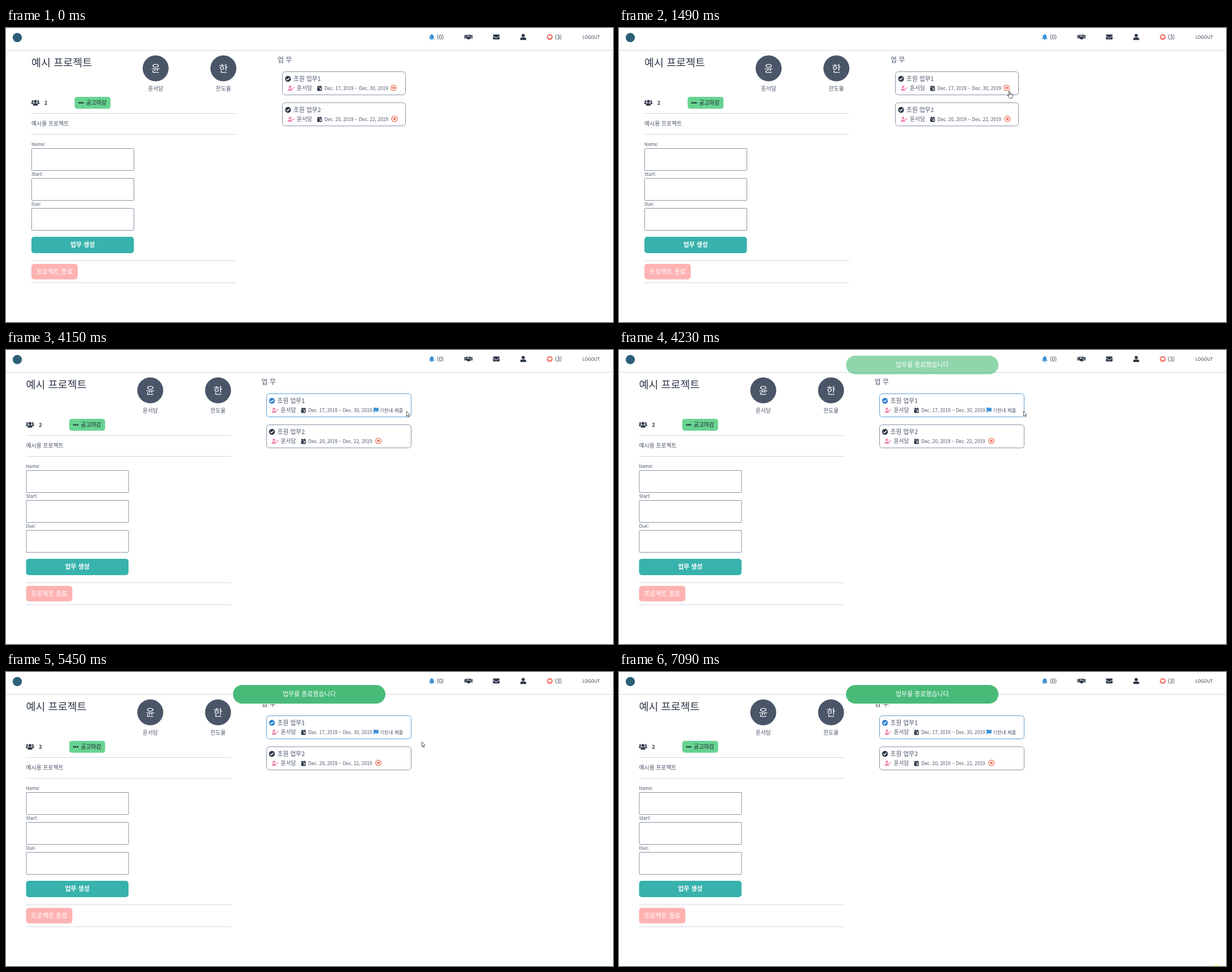
Write an HTML page that moves like this. It is 1075 by 521 pixels and loops after 7.19 s.

```html
<!DOCTYPE html>
<html lang="ko">
<head>
<meta charset="utf-8">
<title>Task board</title>
<style>
html, body { margin: 0; width: 100%; height: 100%; overflow: hidden; background: #fff; }
svg { display: block; width: 1075px; height: 521px; }
text { font-family: "Noto Sans CJK KR", "Noto Sans CJK", "Noto Sans", sans-serif; white-space: pre; }
</style>
</head>
<body>
<svg id="stage" viewBox="0 0 1075 521" xmlns="http://www.w3.org/2000/svg"></svg>
<script>
const LOOP = 7190, TICK = 77.5;
const INK = '#2d3748', GREY = '#4a5568', BLUE = '#3a90d5', RED = '#f0735f', LINE = '#d3d8e2', EDGE = '#8792a5';
const stage = document.getElementById('stage');

// Text is placed by its vertical centre.
const text = (x, cy, size, str, { fill = GREY, weight = 400, anchor = 'start' } = {}) =>
  `<text x="${x}" y="${cy + size * 0.37}" font-size="${size}" fill="${fill}" font-weight="${weight}" text-anchor="${anchor}">${str}</text>`;
const rect = (x, y, w, h, r, fill, extra = '') =>
  `<rect x="${x}" y="${y}" width="${w}" height="${h}" rx="${r}" fill="${fill}" ${extra}/>`;
const circle = (x, y, r, fill, extra = '') => `<circle cx="${x}" cy="${y}" r="${r}" fill="${fill}" ${extra}/>`;
const path = (d, fill, extra = '') => `<path d="${d}" fill="${fill}" ${extra}/>`;
const stroke = (d, color, width) =>
  path(d, 'none', `stroke="${color}" stroke-width="${width}" stroke-linecap="round" stroke-linejoin="round"`);
const group = (x, y, body, id = '') => `<g ${id && `id="${id}"`} transform="translate(${x} ${y})">${body}</g>`;

// Icons are drawn around their centre.
const icon = {
  bell: path('M0 -5.2C.6 -5.2 .8 -4.8 .8 -4.3C2.6 -3.9 3.4 -2.5 3.4 -.8C3.4 1.2 3.8 1.9 4.4 2.4C4.8 2.8 4.6 3.4 4 3.4H-4C-4.6 3.4 -4.8 2.8 -4.4 2.4C-3.8 1.9 -3.4 1.2 -3.4 -.8C-3.4 -2.5 -2.6 -3.9 -.8 -4.3C-.8 -4.8 -.6 -5.2 0 -5.2ZM-1.4 4H1.4A1.4 1.4 0 0 1 -1.4 4Z', BLUE),
  hands: path('M-7.2 -3.4H-5.3V2.6H-7.2ZM5.3 -3.4H7.2V2.6H5.3ZM-4.8 -3.2L-2.8 -4.2H-.4L-2.6 -1.8C-2.8 -.5 -1.4 .2 -.4 -.7L.8 -1.7L4.6 1.6C5 2.4 4 3.2 3.4 2.8C3.2 3.8 2.2 4 1.6 3.6C.8 4.7 -.4 4.5 -1 3.9L-3.8 2.2H-4.8ZM4.8 -3.2L2.8 -4.2H.8L-1.6 -1.7C-1.6 -1.1 -1.1 -1 -.7 -1.4L.9 -2.7L4.8 .7Z', INK),
  mail: path('M-4.9 -4.4H4.9Q5.8 -4.4 5.8 -3.5V-2.6L1 .9Q0 1.5 -1 .9L-5.8 -2.6V-3.5Q-5.8 -4.4 -4.9 -4.4ZM-5.8 -1.4L-1.4 1.7Q0 2.5 1.4 1.7L5.8 -1.4V3.3Q5.8 4.2 4.9 4.2H-4.9Q-5.8 4.2 -5.8 3.3Z', INK),
  user: circle(0, -2.8, 2.8, INK) + path('M-5.2 5.3V3.6Q-5.2 .8 -2.4 .8H2.4Q5.2 .8 5.2 3.6V5.3Z', INK),
  heart: circle(0, 0, 5.3, '#f47c72') + path('M0 3L-2.7 .2C-3.6 -.9 -2.9 -2.4 -1.7 -2.4C-.9 -2.4 -.4 -2 0 -1.4C.4 -2 .9 -2.4 1.7 -2.4C2.9 -2.4 3.6 -.9 2.7 .2Z', '#fff'),
  team: circle(-5, -2.8, 1.6, INK) + circle(5, -2.8, 1.6, INK) + circle(0, -2.2, 2.6, INK) +
    path('M-7.2 2.4V.7Q-7.2 -.7 -5.8 -.7H-4.2Q-3.3 -.7 -2.9 0Q-4.4 .9 -4.6 2.4ZM7.2 2.4V.7Q7.2 -.7 5.8 -.7H4.2Q3.3 -.7 2.9 0Q4.4 .9 4.6 2.4ZM-4.2 5.1V3.7Q-4.2 1 -1.7 1H1.7Q4.2 1 4.2 3.7V5.1Z', INK),
  check: color => circle(0, 0, 5.2, color) + stroke('M-2.5 .2L-.8 1.9L2.6 -1.6', '#fff', 1.4),
  member: circle(-2, -2.4, 2.3, '#f687b3') + path('M-5.8 4.6V3.2Q-5.8 .8 -3.5 .8H-.5Q1.8 .8 1.8 3.2V4.6Z', '#f687b3') +
    stroke('M1.6 -.2L2.9 1.1L5.4 -1.6', '#f687b3', 1.2),
  date: path('M-2.6 -4.8H-1.4V-3.6H1.4V-4.8H2.6V-3.6H3.3Q4.1 -3.6 4.1 -2.8V-1.9H-4.1V-2.8Q-4.1 -3.6 -3.3 -3.6H-2.6ZM-4.1 -1.3H4.1V3.8Q4.1 4.6 3.3 4.6H-3.3Q-4.1 4.6 -4.1 3.8ZM.3 .2V2.8H2.8V.2Z', INK, 'fill-rule="evenodd"'),
  stop: circle(0, 0, 4.9, 'none', `stroke="${RED}" stroke-width="1.3"`) + rect(-2.1, -2.1, 4.2, 4.2, .5, RED),
  flag: path('M-4.4 -4.8H-3.3V-3.9C-1.6 -4.9 .4 -3 4.4 -4.2V1.9C1.2 3.3 -1 1.2 -3.3 2.2V4.9H-4.4Z', BLUE)
};

const header = path('M0 39.5H1075', 'none', `stroke="${LINE}"`) +
  circle(20, 17, 8.2, '#2d6078') +
  group(754, 16, icon.bell) + text(763, 16, 10, '(0)', { fill: INK }) +
  group(819, 16, icon.hands) + group(868.3, 16, icon.mail) + group(916, 16, icon.user) +
  group(963, 16, icon.heart) + text(972, 16, 10, '(3)', { fill: INK }) +
  text(1021, 16.5, 7.7, 'LOGOUT', { fill: INK });

const avatar = (x, name) => circle(x, 71.5, 23, GREY) +
  text(x, 71.5, 17.5, name[0], { fill: '#fff', weight: 300, anchor: 'middle' }) +
  text(x, 107.3, 9.8, name, { anchor: 'middle' });
const field = (y, label) => text(45, y - 6.5, 8.1, label, { weight: 300 }) +
  rect(45.5, y + .5, 181, 39, 1, '#fff', `stroke="${EDGE}"`);

const project = text(45, 61, 18.5, '예시 프로젝트', { fill: INK, weight: 300 }) +
  avatar(265, '윤서담') + avatar(385, '한도율') +
  group(52, 132.3, icon.team) + text(67.7, 132.8, 9.4, '2', { fill: INK, weight: 700 }) +
  rect(121.5, 122, 63.5, 21, 4.5, '#68d391') +
  [129.6, 132.9, 136.2].map(x => circle(x, 132.7, 1.35, '#1a202c')).join('') +
  text(142, 132.8, 9.8, '공고마감', { fill: '#1a202c', weight: 500 }) +
  [151.5, 188.5, 412.5, 451.5].map(y => path(`M45 ${y}H408`, 'none', `stroke="${LINE}"`)).join('') +
  text(45, 169.3, 9.9, '예시용 프로젝트') +
  field(213, 'Name:') + field(266, 'Start:') + field(319, 'Due:') +
  rect(45, 370, 181.5, 29, 5, '#38b2ac') +
  text(135.7, 384, 11, '업무 생성', { fill: '#fff', weight: 700, anchor: 'middle' }) +
  rect(45, 418, 82, 27.5, 5, '#feb2b2') +
  text(86, 431.7, 11.1, '프로젝트 종료', { fill: '#fff', anchor: 'middle' });

const task = (y, n, dates) => text(509, y + 12.8, 10.8, '조원 업무' + n) +
  group(505, y + 29.7, icon.member) + text(515, y + 29, 9.8, '윤서담') +
  group(555.3, y + 29.8, icon.date) + text(564, y + 30, 8.35, dates, { weight: 300 });
const frame = (id, y) => rect(489.5, y + .5, 218, 41, 5, '#fff', `id="${id}" stroke="${EDGE}"`);

const board = text(481, 57, 12, '업 무') +
  frame('card1', 77) + frame('card2', 132) +
  task(77, 1, 'Dec. 17, 2019 ~ Dec. 30, 2019') + task(132, 2, 'Dec. 20, 2019 ~ Dec. 22, 2019') +
  group(499.5, 145, icon.check(INK)) + group(688, 161, icon.stop) +
  group(0, 0, group(499.5, 90, icon.check(INK)) + group(686.5, 106, icon.stop), 'open') +
  group(0, 0, group(499.5, 90, icon.check('#3182ce')) + group(683.8, 106.5, icon.flag) +
    text(690.3, 107, 8.5, '기한내 제출'), 'closed');

const toast = rect(402, 23, 270, 33, 16.5, '#48bb78') +
  text(537, 39, 11, '업무를 종료했습니다', { fill: '#fff', anchor: 'middle' });

const outline = 'stroke="#333" stroke-width=".8" stroke-linejoin="round"';
const arrow = path('M.4 .5V9.3L2.3 7.5L3.6 10.7L5 10.1L3.7 7H6.2Z', '#fff', `id="arrow" ${outline}`);
const hand = path('M-.9 9.4V1.3Q-.9 .4 0 .4Q.9 .4 .9 1.3V5.1Q1.8 4.4 2.6 5.3Q3.5 4.8 4.2 5.8Q6.4 5.2 6.5 7.2V9.6Q6.4 11.3 5.4 13.3H.2Q-.5 11.7 -2.4 9.6Q-3.5 8 -2.3 7.5Q-1.5 7.6 -.9 9.4ZM.9 5.1V7.6M2.6 5.3V7.6M4.2 5.8V7.8', '#fff', `id="hand" ${outline}`);

stage.innerHTML = header + group(0, 0, project, 'project') + group(0, 0, board, 'board') +
  group(0, 0, toast, 'toast') +
  `<ellipse id="glow" cx="1057.5" cy="521.2" rx="4.5" ry="2" fill="#ffff4d"/>` +
  group(0, 0, arrow + hand, 'pointer');

const part = {};
stage.querySelectorAll('[id]').forEach(el => part[el.id] = el);
const set = (id, name, value) => part[id].setAttribute(name, value);
const show = (id, on) => set(id, 'visibility', on ? 'inherit' : 'hidden');
const move = (id, x, y) => set(id, 'transform', `translate(${x} ${y})`);

const linear = p => p;
const easeOut = p => 1 - (1 - p) ** 2;
const smooth = p => p * p * (3 - 2 * p);

// Pointer moves: start time, number of ticks, from, to, easing.
const moves = [
  [170, 10, [1035, 552], [712, 115], easeOut],
  [950, 5, [712, 115], [692, 111], linear],
  [1490, 4, [692.7, 112], [686, 108], linear],
  [4150, 3, [702, 107], [723, 109], linear],
  [5450, 7, [723, 109], [949, 363], smooth],
  [6050, 2, [949, 363], [963, 404], linear],
  [6170, 9, [963, 404], [1049, 511], linear]
];

function pointerAt(t) {
  const [start, ticks, from, to, ease] = moves.filter(m => m[0] <= t).pop() || moves[0];
  const tick = Math.max(0, Math.floor((t - start) / TICK));
  const p = ease(Math.min(1, (tick + 1) / ticks));
  return from.map((v, i) => Math.round(v + (to[i] - v) * p));
}

function draw(t) {
  const done = t >= 4150;
  move('project', done ? -9.5 : 0, 0);
  move('board', done ? -28.5 : 0, 0);
  for (const id of ['card1', 'card2']) set(id, 'width', done ? 256 : 218);
  for (const id of ['card1', 'card2']) set(id, 'x', done ? 490 : 489.5);
  set('card1', 'stroke', done ? '#5a9fd8' : EDGE);
  show('open', !done);
  show('closed', done);

  const arriving = t < 4310;
  show('toast', t >= 4230);
  move('toast', 0, arriving ? -13 : 0);
  set('toast', 'opacity', arriving ? .6 : 1);

  const grab = (t >= 1260 && t < 2040) || (t >= 2660 && t < 4150);
  show('pointer', t >= 170 && t < 6840);
  show('hand', grab);
  show('arrow', !grab);
  move('pointer', ...pointerAt(t));
  show('glow', t >= 7090);
}

const began = performance.now();
function tick() {
  draw((performance.now() - began) % LOOP);
  requestAnimationFrame(tick);
}
tick();
</script>
</body>
</html>
```
